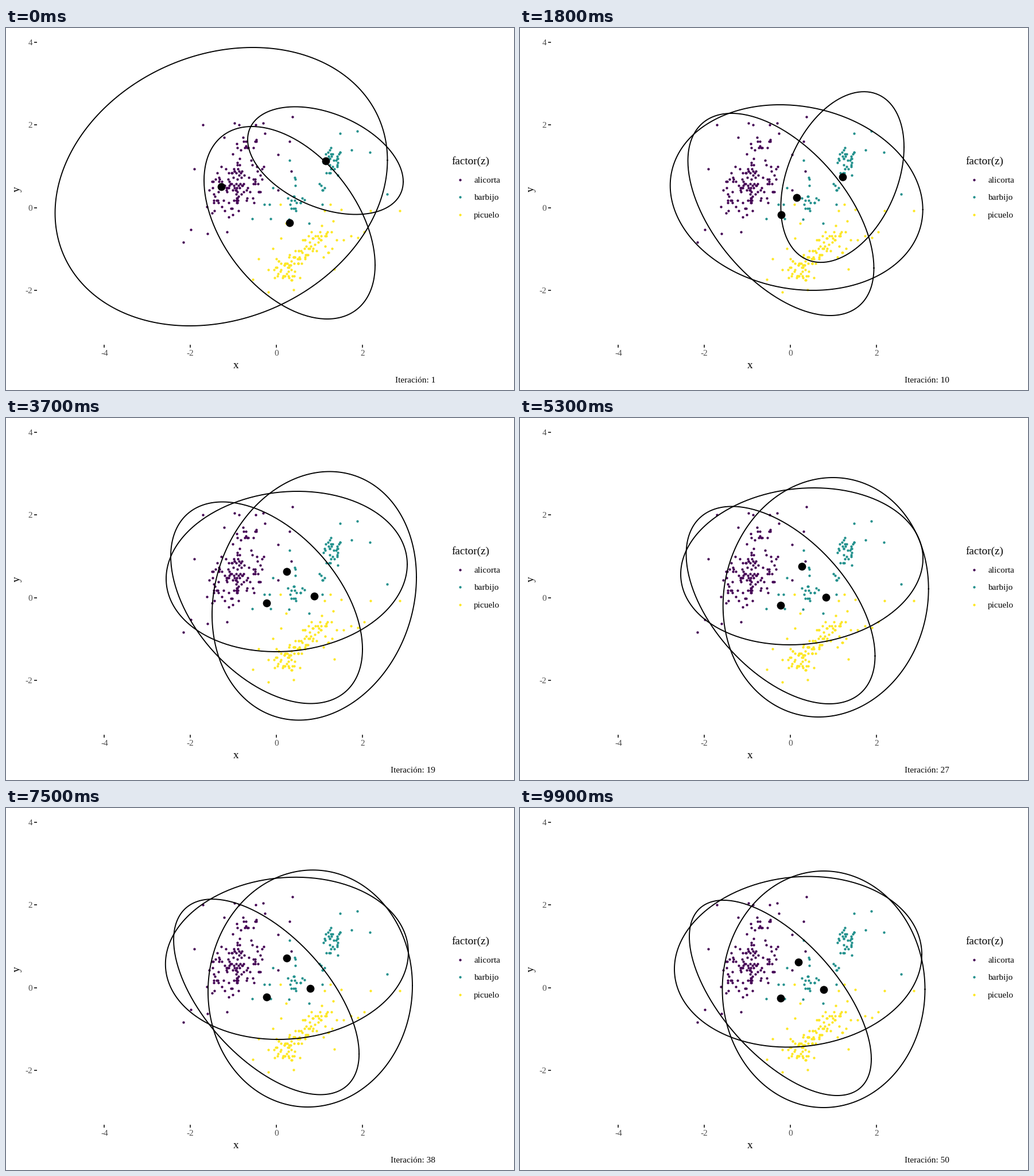
Animation, 885 px wide and 632 px high, one loop 10 s. Source, as a matplotlib script:

```python
import matplotlib.pyplot as plt
import numpy as np
from matplotlib.animation import FuncAnimation

W, H, DPI = 885, 632, 100
FRAMES, INTERVAL, STEPS = 100, 100, 50
PT = 72 / DPI
SMALL, LARGE = 15.3 * PT, 19.1 * PT
PURPLE, TEAL, YELLOW = "#440154", "#21908C", "#FDE725"

plt.rcParams["font.family"] = "Liberation Serif"
rng = np.random.default_rng(7)

fig = plt.figure(figsize=(W / DPI, H / DPI), dpi=DPI, facecolor="white")
ax = fig.add_axes([0, 0, 1, 1])
ax.set_xlim(0, W)
ax.set_ylim(H, 0)
ax.axis("off")


def label(x, y, s, size=SMALL, color="black", **kw):
    kw = {"ha": "left", "va": "baseline", **kw}
    return ax.text(x, y, s, fontsize=size, color=color, **kw)


def dots(x, y, color, diameter, z):
    return ax.scatter(x, y, s=(diameter * PT) ** 2, c=color, linewidths=0, zorder=z)


def core(n, cx, cy, sx, sy, rho):
    """Truncated normal cloud, with y on the measuring grid."""
    u = rng.normal(size=(n * 4, 2))
    u = u[np.hypot(*u.T) < 1.75][:n]
    x = cx + sx * u[:, 0]
    y = cy + sy * (rho * u[:, 0] + np.sqrt(1 - rho**2) * u[:, 1])
    return np.column_stack([x, 249.6 + 3.66 * np.round((y - 249.6) / 3.66)])


def cloud(color, strays, *cores):
    pts = np.vstack([strays, *(core(*c) for c in cores)])
    dots(pts[:, 0], pts[:, 1], color, 4.3, 2)


cloud(PURPLE,
      [(343, 169), (398, 166), (406, 169), (435, 169), (448, 166), (499, 155),
       (380, 191), (451, 184), (474, 221), (494, 198), (328, 246), (309, 374),
       (322, 352), (351, 359), (385, 356), (497, 250), (474, 283)],
      (114, 403, 278, 32, 33, -0.35), (15, 415, 204, 18, 10, -0.2))
cloud(TEAL,
      [(612, 180), (582, 184), (634, 217), (664, 290), (602, 213), (494, 231),
       (465, 279), (450, 308), (459, 308), (429, 333), (461, 333), (528, 341),
       (551, 308), (520, 300)],
      (32, 567, 237, 13, 17, -0.1), (18, 502, 298, 9, 24, -0.2),
      (5, 550, 280, 8, 5, 0))
cloud(YELLOW,
      [(686, 319), (635, 319), (624, 356), (613, 366), (601, 363), (588, 370),
       (565, 308), (584, 317), (555, 319), (478, 308), (570, 337), (488, 341),
       (479, 367), (465, 385), (440, 403), (430, 439), (457, 461), (501, 457),
       (572, 421)],
      (58, 494, 416, 22, 18, -0.4), (44, 542, 377, 20, 20, -0.4))

# Axes
tick = dict(color="#333333", lw=1.9 * PT, solid_capstyle="butt")
for v in (-4, -2, 0, 2):
    x = 471 + 74.9 * v
    ax.plot([x, x], [552.5, 557.7], **tick)
    label(x, 572, str(v), color="#4D4D4D", ha="center")
for v in (-2, 0, 2, 4):
    y = 313.5 - 72.1 * v
    ax.plot([49, 54.2], [y, y], **tick)
    label(46, y + 5.2, str(v), color="#4D4D4D", ha="right")
label(400.5, 593.5, "x", LARGE, ha="center")
label(19, 281.5, "y", LARGE, ha="center", va="center", rotation=90)

# Legend
label(776, 237.5, "factor(z)", LARGE)
for i, (name, color) in enumerate(
        [("alicorta", PURPLE), ("barbijo", TEAL), ("picuelo", YELLOW)]):
    y = 265 + 30.3 * i
    dots([790.5], [y], color, 4.3, 2)
    label(815, y + 5, name)


def warp(f):
    """Log time: the fit moves fast at first, then settles."""
    return np.log1p(np.asarray(f) / 6)


class Ring:
    """Ellipse with key poses: centre x, y, half width, half height, correlation."""
    keys = warp([0, 11, 18, 26, 37, 53, 83, 99])
    theta = np.linspace(0, 2 * np.pi, 241)

    def __init__(self, *poses):
        self.poses = np.array(poses)
        self.slopes = np.gradient(self.poses, self.keys, axis=0)
        self.line, = ax.plot([], [], color="black", lw=1.9 * PT, zorder=3)

    def pose(self, f):
        """Cubic Hermite blend of the key poses."""
        t = warp(f)
        i = min(np.searchsorted(self.keys, t, "right") - 1, len(self.keys) - 2)
        h = self.keys[i + 1] - self.keys[i]
        s = (t - self.keys[i]) / h
        p, m = self.poses, self.slopes * h
        return ((1 + 2 * s) * (1 - s) ** 2 * p[i] + s * (1 - s) ** 2 * m[i]
                + s * s * (3 - 2 * s) * p[i + 1] + s * s * (s - 1) * m[i + 1])

    def move(self, f):
        cx, cy, a, b, r = self.pose(f)
        self.line.set_data(cx + a * np.cos(self.theta),
                           cy - b * np.cos(self.theta - np.arccos(r)))
        return cx, cy


wide = Ring((375, 277, 289.5, 243, .19), (469.5, 294, 227.5, 174, -.08),
            (481.7, 296, 220, 162, -.13), (485.5, 286, 213, 152, -.03),
            (489, 268, 210, 140, .09), (491, 259, 211, 137, .1),
            (488, 264.5, 212.5, 144, .07), (484.5, 268.5, 215.5, 149, .085))
right = Ring((556.5, 231.5, 135.5, 94, -.39), (565, 237, 113, 118, .08),
             (561.7, 260.2, 107.3, 149, .35), (550, 298, 158, 221, .24),
             (537, 310.5, 178, 217, .15), (532.7, 313, 179, 209, .07),
             (529.5, 315.7, 177.5, 206.7, .015), (529, 316.5, 176.5, 206.5, 0))
left = Ring((494, 340, 149, 168, -.44), (463, 328, 159, 175, -.51),
            (454.5, 325.5, 162, 176.5, -.53), (454, 323.5, 165, 177, -.5),
            (454, 322.5, 167, 176, -.46), (454, 326.7, 164.5, 172.3, -.515),
            (453.5, 330.5, 160.5, 170.5, -.6), (453.5, 331.5, 158.5, 170.5, -.625))
rings = [wide, right, left]
centres = dots([0] * 3, [0] * 3, "black", 13.8, 4)
caption = label(748, 619, "", ha="right")


def update(f):
    centres.set_offsets([ring.move(f) for ring in rings])
    step = round(1 + (STEPS - 1) * f / (FRAMES - 1))
    caption.set_text(f"Iteración: {step}")
    return [*(ring.line for ring in rings), centres, caption]


anim = FuncAnimation(fig, update, frames=FRAMES, interval=INTERVAL,
                     repeat=True, repeat_delay=0, blit=False)
plt.show()
```
